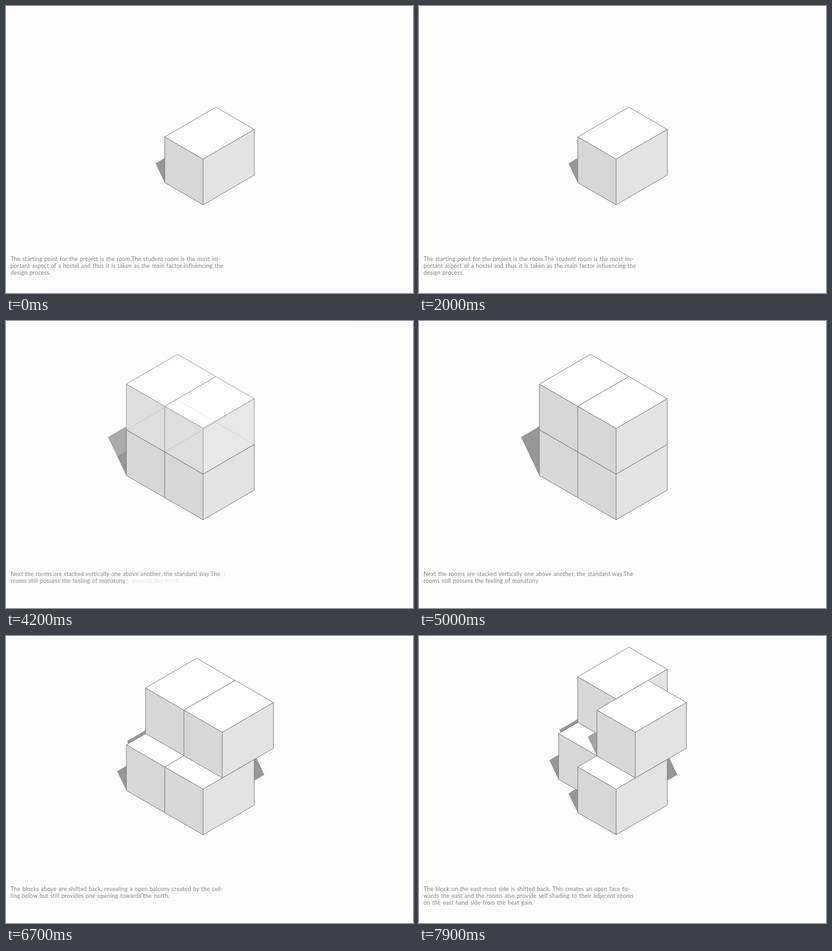
An HTML page that plays this animation: 891 by 628 pixels, repeating every 8 s.

```html
<!DOCTYPE html>
<html lang="en">
<head>
<meta charset="utf-8">
<title>Room stacking</title>
<style>
  html, body { margin: 0; width: 100%; height: 100%; overflow: hidden; background: #fdfdfd; }
  svg { display: block; width: 891px; height: 628px; }
  .edge { stroke: #66666a; stroke-width: 1; stroke-linejoin: round; }
  text { font: 12.5px Lato, sans-serif; letter-spacing: .25px; word-spacing: .85px; fill: #818187; }
</style>
</head>
<body>
<svg id="stage" viewBox="0 0 891 628"></svg>
<script>
const LOOP = 8000, FIRST = 2520, STEP = 1440, FADE = 300;
const ORIGIN = [431.5, 435], DEPTH = [112, -65], SIDE = [-84, -48.5], SUN = [-20, -42];
const HEIGHT = 100, SHIFT = 0.375;

// A cube is [depth, side, level] in units of one room.
const S = SHIFT;
const stages = [
  { cubes: [[0, 0, 0]],
    lines: ["The starting point for the project is the room.The student room is the most im-",
            "portant aspect of a hostel and thus it is taken as the main factor influencing the",
            "design process."] },
  { cubes: [[0, 1, 0], [0, 0, 0]],
    lines: ["The room is first stacked side by side, the typicall rooms in a row way. The result",
            "is monotonous and has a single opening face towards the north."] },
  { cubes: [[0, 1, 0], [0, 0, 0], [0, 1, 1], [0, 0, 1]],
    lines: ["Next the rooms are stacked vertically one above another, the standard way.The",
            "rooms still possess the feeling of monatony"] },
  { cubes: [[0, 1, 0], [0, 0, 0], [S, 1, 1], [S, 0, 1]],
    lines: ["The blocks above are shifted back, revealing a open balcony created by the ceil-",
            "ling below but still provides one opening towards the north."] },
  { cubes: [[S, 1, 0], [0, 0, 0], [2 * S, 1, 1], [S, 0, 1]],
    lines: ["The block on the east-most side is shifted back. This creates an open face to-",
            "wards the east and the rooms also provide self shading to their adjecent rooms",
            "on the east hand side from the heat gain."] },
];

const project = (d, s, z) => [0, 1].map(i =>
  ORIGIN[i] + d * DEPTH[i] + s * SIDE[i] - (i ? z * HEIGHT : 0));
const poly = (points, fill, cls = "") =>
  `<polygon class="${cls}" fill="${fill}" points="${points.join(" ")}"/>`;
const footprint = (d, s, z) =>
  [[0, 0], [1, 0], [1, 1], [0, 1]].map(([i, j]) => project(d + i, s + j, z));

function cube([d, s, z]) {
  const [a, b, , c] = footprint(d, s, z);
  const top = footprint(d, s, z + 1);
  return poly([a, c, top[3], top[0]], "#d7d7d7", "edge") +
         poly([a, b, top[1], top[0]], "#e3e3e3", "edge") +
         poly(top, "#fff", "edge");
}

// Shadow of a cube on a horizontal plane, swept from its base to its top.
function shadow([d, s, z], plane, fill) {
  const base = footprint(d, s, plane);
  const cast = (p, level) => p.map((v, i) => v + SUN[i] * level);
  const low = base.map(p => cast(p, z - plane));
  const high = base.map(p => cast(p, z - plane + 1));
  return poly(high, fill) + low.map((p, i) => {
    const j = (i + 1) % 4;
    return poly([p, low[j], high[j], high[i]], fill);
  }).join("");
}

function drawStage({ cubes, lines }) {
  const lower = cubes.filter(c => !c[2]), upper = cubes.filter(c => c[2]);
  const ground = cubes.map(c => shadow(c, 0, "#979797")).join("");
  const roof = upper.length ? shadow(upper[1], 1, "#a3a3a3") : "";
  const text = lines.map((line, i) => `<text x="10" y="${558 + 15 * i}">${line}</text>`).join("");
  return `<g><rect width="891" height="628" fill="#fdfdfd"/>${ground}` +
    lower.map(cube).join("") + roof + upper.map(cube).join("") + text + "</g>";
}

const svg = document.getElementById("stage");
svg.innerHTML = stages.map(drawStage).join("");
const layers = [...svg.children];

function render(now) {
  const t = now % LOOP;
  layers.forEach((layer, i) => {
    const alpha = i ? (t - FIRST - (i - 1) * STEP) / FADE : 1;
    layer.setAttribute("opacity", Math.min(1, Math.max(0, alpha)));
  });
}

const start = performance.now();
function tick() {
  render(performance.now() - start);
  requestAnimationFrame(tick);
}
tick();
</script>
</body>
</html>
```
